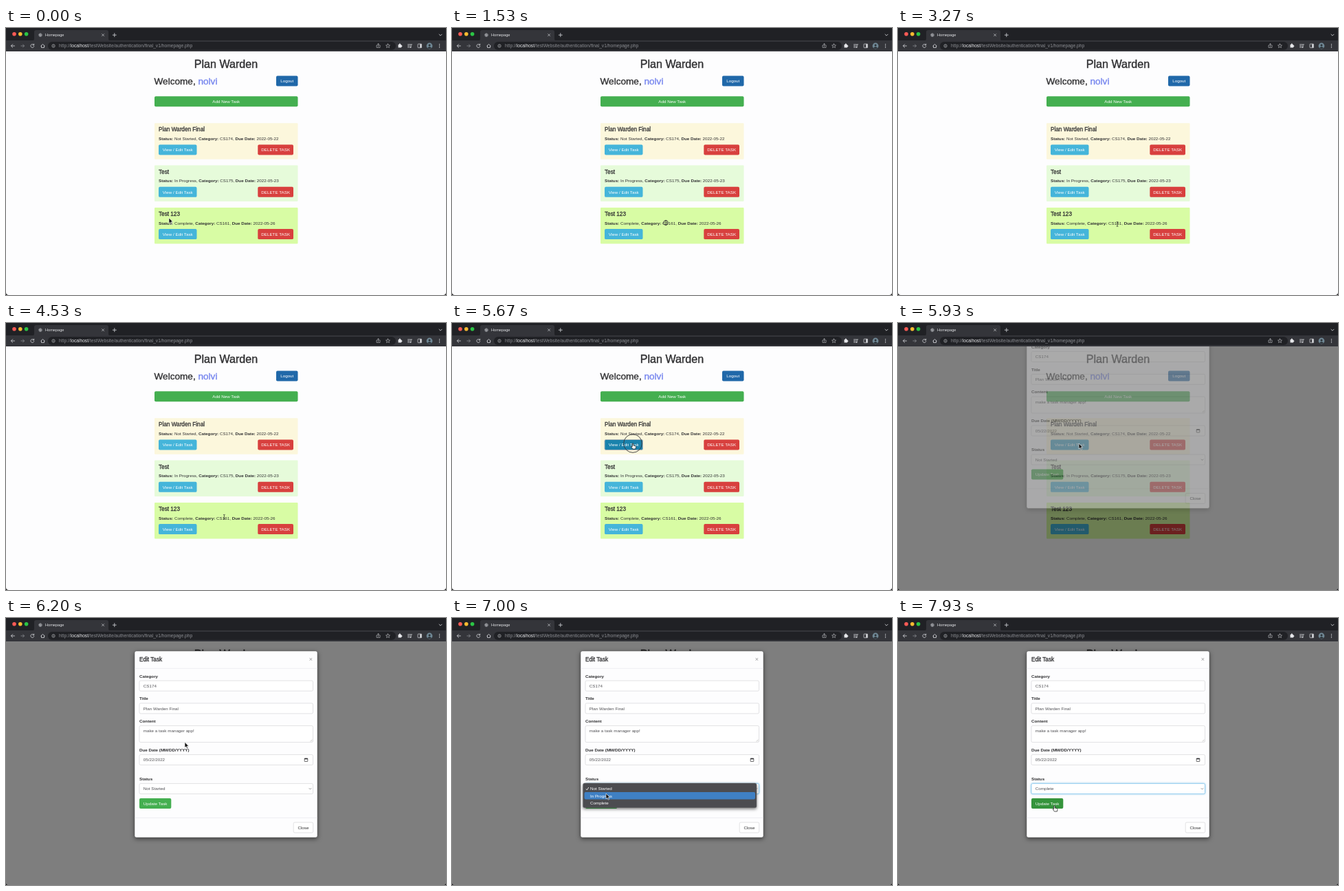
An HTML page for the animation above (8000 ms loop, 640x388 px).

```html
<!DOCTYPE html>
<html lang="en">
<head>
<meta charset="utf-8">
<title>Homepage</title>
<style>
  html, body { margin: 0; width: 100%; height: 100%; overflow: hidden; background: #111114; }
  svg { display: block; width: 100vw; height: 100vh; }
  text { font-family: "Liberation Sans", Arial, sans-serif; white-space: pre; }
</style>
</head>
<body>
<svg id="stage" viewBox="0 0 640 388"></svg>
<script>
const LOOP = 8000;
const INK = '#303032';
const EDGE = '#cfcfd2';
const VIEW = '#45b5da', GREEN = '#44af50', RED = '#d8403e', BLUE = '#2068a9';
const BASE = 6.26; // page body size
const stage = document.getElementById('stage');

// ---- drawing helpers -------------------------------------------------
const rect = (x, y, w, h, fill, r = 0, more = '') =>
  `<rect x="${x}" y="${y}" width="${w}" height="${h}" rx="${r}" fill="${fill}" ${more}/>`;
const text = (x, y, s, size = BASE, fill = INK, more = '') =>
  `<text x="${x}" y="${y}" font-size="${size}" fill="${fill}" ${more}>${s}</text>`;
const line = (d, color, w = 0.8, more = '') =>
  `<path d="${d}" fill="none" stroke="${color}" stroke-width="${w}" ${more}/>`;
const dot = (x, y, r, fill, more = '') =>
  `<circle cx="${x}" cy="${y}" r="${r}" fill="${fill}" ${more}/>`;
const bold = s => `<tspan font-weight="700">${s}</tspan>`;
const medium = (w = 0.28) => `stroke="${INK}" stroke-width="${w}"`;
const centered = 'text-anchor="middle"';

function button(x, y, w, label, fill, id = '') {
  return rect(x, y, w, 15, fill, 1.9, id && `id="${id}"`) +
    text(x + w / 2, y + 9.8, label, BASE, '#fff', centered);
}

// ---- browser frame ---------------------------------------------------
function chrome() {
  const pale = '#c8c9cd', dim = '#8b8d92', dark = '#202125', bar = '#34353a';
  const icon = (d, w = 0.9) => line(d, pale, w, 'stroke-linecap="round" stroke-linejoin="round"');
  return rect(0, 0, 640, 19, dark) +
    rect(0, 18, 640, 16, bar) +
    `<path d="M38 18.5q3 0 3-3V6q0-3 3-3h102q3 0 3 3v9.500q0 3 3 3z" fill="${bar}"/>` +
    dot(12, 8.7, 2.8, '#fa5a55') + dot(20.800, 8.7, 2.8, '#f8bb30') + dot(29.600, 8.7, 2.8, '#2bc545') +
    dot(50, 10.200, 2.7, '#74767b') + line('M47.600 9.500q2.400 2 5 .5M50 7.500q-1 2.500 0 5.400', '#c4c5c9', 0.5) +
    text(57, 12.200, 'Homepage', 5.6, '#e2e3e6') +
    icon('M139.500 8.600l3.200 3.200m0-3.200l-3.200 3.200', 0.7) +
    icon('M155.300 10.200h5M157.800 7.700v5') + icon('M630 9.200l2 2 2-2') +
    icon('M12.500 26h-5m2.200-2.300L7.400 26l2.300 2.300') +
    line('M21.500 26h5m-2.200-2.300L26.600 26l-2.300 2.300', dim) +
    icon('M40.400 24.500a2.500 2.500 0 1 0 .4 2.200M40.700 23.200v1.700h-1.700') +
    icon('M50.800 26l2.700-2.500 2.700 2.500M51.500 25.800v2.700h4v-2.700') +
    rect(61, 20, 506, 12, dark, 6) +
    dot(69, 26, 2.2, 'none', `stroke="${pale}" stroke-width=".6"`) + icon('M69 25.800v1.300M69 24.700v.1', 0.6) +
    text(77, 28.200, `http://<tspan fill="#e6e7ea">localhost</tspan>/testWebsite/authentication/final_v1/homepage.php`, 6.68, dim) +
    icon('M540 25h-1v3.400h5V25h-1M541.500 27v-4.200m-1.300 1.200l1.300-1.300 1.300 1.300', 0.6) +
    icon('M555.500 23l.9 1.900 2.100.2-1.600 1.400.5 2.100-1.900-1.100-1.900 1.100.5-2.100-1.600-1.400 2.100-.2z', 0.6) +
    rect(570.500, 24, 4.600, 4.600, '#e6e7ea', 0.6) + dot(572.800, 23.600, 1.1, '#e6e7ea') + dot(575.300, 26.300, 1.1, '#e6e7ea') +
    icon('M584.500 24h4M584.500 26h2.500M584.500 28h2M589 28v-4h1.500') + dot(588.300, 28, 1, pale) +
    rect(599, 23.200, 5.500, 5.500, 'none', 0.6, `stroke="${pale}" stroke-width=".8"`) + rect(602, 23.200, 2.500, 5.500, pale) +
    dot(616, 26, 4.4, '#6f8794') + dot(616, 25, 1.500, '#2b3136') + `<path d="M613 29q3-3.700 6 0q-3 2-6 0" fill="#2b3136"/>` +
    dot(630.500, 23.700, 0.7, pale) + dot(630.500, 26, 0.7, pale) + dot(630.500, 28.300, 0.7, pale);
}

// ---- task list -------------------------------------------------------
function card(y, fill, title, status, category, due, id) {
  return rect(216, y, 208.500, 52.500, fill, 1) +
    text(222, y + 12, title, 8.2, INK, medium()) +
    text(222, y + 24.700, `${bold('Status:')} ${status}, ${bold('Category:')} ${category}, ${bold('Due Date:')} ${due}`) +
    button(222, y + 31.200, 55.500, 'View / Edit Task', VIEW, id) +
    button(366.300, y + 31.200, 51.700, 'DELETE TASK', RED);
}

function page() {
  return rect(0, 34, 640, 354, '#fdfdfe') +
    text(320, 57.800, 'Plan Warden', 16.1, INK, `${centered} ${medium(0.4)}`) +
    text(215.500, 82, `Welcome, <tspan fill="#7484ee" stroke="#7484ee">nolvi</tspan>`, 13.6, INK, medium(0.35)) +
    button(393, 69.500, 31.500, 'Logout', BLUE) +
    button(216, 99.200, 208.500, 'Add New Task', GREEN) +
    card(138.300, '#fcf7dc', 'Plan Warden Final', 'Not Started', 'CS174', '2022-05-22', 'edit') +
    card(199.600, '#e6fbda', 'Test', 'In Progress', 'CS175', '2022-05-23') +
    card(260.900, '#d8fca4', 'Test 123', 'Complete', 'CS161', '2022-05-26');
}

// ---- edit dialog -----------------------------------------------------
function field(y, label, value, h = 15, id = '') {
  return text(194, y, label, BASE, INK, 'font-weight="700"') +
    rect(194, y + 4.600, 252.500, h, '#fff', 1.8, `stroke="${EDGE}" stroke-width=".6" ${id && `id="${id}"`}`) +
    text(199.800, y + 14.300, value, BASE, '#505054', id && `id="${id}Text"`);
}

function dialog() {
  return rect(187, 48, 266, 271, '#fdfdfe', 2.7, 'stroke="#555" stroke-width=".5" style="filter:drop-shadow(0 2px 3px rgba(0,0,0,.5))"') +
    text(194, 63.300, 'Edit Task', 8.2, INK, medium()) +
    text(443.500, 62.500, '×', 9, '#9a9a9c', centered) +
    line('M187 73.300h266M187 290.300h266', '#e5e5e7', 0.6) +
    field(86.500, 'Category', 'CS174') +
    field(119.300, 'Title', 'Plan Warden Final') +
    field(152, 'Content', 'make a task manager app!', 24) +
    line('M442.500 179.500l3-3m-1.300 3l1.300-1.300', '#888', 0.4) +
    field(194, 'Due Date (MM/DD/YYYY)', '05/22/2022') +
    rect(434.200, 204.200, 4.600, 4.300, 'none', 0.3, `stroke="${INK}" stroke-width=".7"`) + rect(434.200, 203.800, 4.600, 1.500, INK) +
    field(236, 'Status', 'Not Started', 15, 'status') +
    line('M440.800 247.300l1.700 1.700 1.700-1.700', '#666', 0.7) +
    button(194, 262, 46.300, 'Update Task', GREEN, 'update') +
    rect(418.200, 297, 28.500, 15, '#fff', 1.8, `stroke="${EDGE}" stroke-width=".6"`) +
    text(432.400, 306.800, 'Close', BASE, INK, centered);
}

const options = ['Not Started', 'In Progress', 'Complete'];
function menu() {
  return rect(190.500, 240, 252.500, 35.800, '#4c4c50', 2.5, 'stroke="#77777a" stroke-width=".4" style="filter:drop-shadow(0 2px 2px rgba(0,0,0,.5))"') +
    rect(192.500, 0, 248.500, 10.300, '#3f80c4', 1.8, 'id="pick"') +
    line('M195 248.300l1.300 1.700 2.500-4', '#fff', 0.8) +
    options.map((s, i) => text(201, 250.200 + i * 10.300, s, BASE, '#fff')).join('');
}

// ---- pointers --------------------------------------------------------
const pointers = {
  arrow: `<path d="M0 0v8l1.900-1.700 1.300 2.900 1.300-.6-1.300-2.800h2.500z" fill="#111" stroke="#fff" stroke-width=".6"/>`,
  beam: line('M-1.300-3.500q1.300 0 1.300 1v5q0 1 1.300 1M1.300-3.500q-1.300 0-1.300 1M0 2.500q0 1-1.300 1', '#222', 0.7),
  hand: `<path d="M-.8.2q.8-1 1.500 0v2.800l3 .7q1 .4.8 1.700l-.6 2.700h-4l-2.300-3.300q0-1 1.600 0z" fill="#fff" stroke="#111" stroke-width=".7"/>`
};

stage.innerHTML = `<defs><clipPath id="win"><path d="M0 0h640v384q0 4-4 4H4q-4 0-4-4z"/></clipPath></defs>
  <g clip-path="url(#win)">${page()}
    ${rect(0, 34, 640, 354, '#000', 0, 'id="shade"')}
    <g id="modal">${dialog()}</g><g id="menu">${menu()}</g>
    ${chrome()}</g>
  <circle id="ring" fill="none" stroke="#38383c" stroke-width=".9"/>
  <g id="pointer">${Object.entries(pointers).map(([k, s]) => `<g id="${k}">${s}</g>`).join('')}</g>`;

// ---- motion ----------------------------------------------------------
const $ = id => document.getElementById(id);
const clamp = v => Math.max(0, Math.min(1, v));
const part = (t, from, length) => clamp((t - from) / length);
const show = (id, on) => $(id).setAttribute('display', on ? 'inline' : 'none');
const set = (id, name, value) => $(id).setAttribute(name, value);

// pointer stops: time, x, y
const path = [
  [0, 237, 276], [250, 237, 276], [950, 311, 283], [2100, 311, 283], [2700, 319, 285],
  [4450, 319, 285], [5250, 263, 175], [6130, 263, 175], [6550, 224, 247], [6750, 224, 247],
  [6960, 224, 255], [7180, 224, 255], [7360, 224, 267], [7560, 224, 267], [7880, 227.500, 273], [8000, 227.500, 273]
];
const shapes = [[0, 'arrow'], [480, 'beam'], [4620, 'arrow'], [5080, 'hand'], [5860, 'arrow'], [7840, 'hand']];
const clicks = [[1500, 180], [5540, 160], [6600, 130], [7430, 130]];

function place(t) {
  const i = path.findIndex(p => p[0] > t);
  const [t0, x0, y0] = path[i - 1], [t1, x1, y1] = path[i];
  const u = (t - t0) / (t1 - t0), k = u * u * (3 - 2 * u);
  return [x0 + (x1 - x0) * k, y0 + (y1 - y0) * k];
}

function draw(t) {
  const [x, y] = place(t);
  set('pointer', 'transform', `translate(${x} ${y})`);
  const shape = shapes.filter(s => s[0] <= t).pop()[1];
  Object.keys(pointers).forEach(k => show(k, k === shape));

  const click = clicks.find(([at, held]) => t >= at && t < at + held);
  show('ring', click);
  if (click) {
    set('ring', 'cx', x);
    set('ring', 'cy', y);
    set('ring', 'r', 13.3 * part(t, click[0], 125));
  }

  const pressed = t >= 5540 && t < 5720;
  set('edit', 'fill', pressed ? '#1a82ac' : t >= 5080 ? '#2f9fc6' : VIEW);
  set('edit', 'stroke', pressed ? '#b0b4b8' : 'none');

  set('shade', 'opacity', 0.5 * part(t, 5730, 150));
  const slide = 1 - (1 - part(t, 5880, 300)) ** 1.7;
  set('modal', 'transform', `translate(0 ${-68 * (1 - slide)})`);
  set('modal', 'opacity', part(t, 5880, 150));

  const focus = t >= 6600;
  set('status', 'stroke', focus ? '#66b6e6' : EDGE);
  $('status').style.filter = focus ? 'drop-shadow(0 0 1.5px #86c6ea)' : '';
  $('statusText').textContent = options[t >= 7470 ? 2 : 0];
  show('menu', t >= 6640 && t < 7520);
  const row = Math.round(clamp((y - 247) / 20) * 2);
  set('pick', 'y', 242.800 + row * 10.300);
  set('update', 'fill', t >= 7840 ? '#35943c' : GREEN);
}

const start = performance.now();
function tick() {
  draw((performance.now() - start) % LOOP);
  requestAnimationFrame(tick);
}
tick();
</script>
</body>
</html>
```
